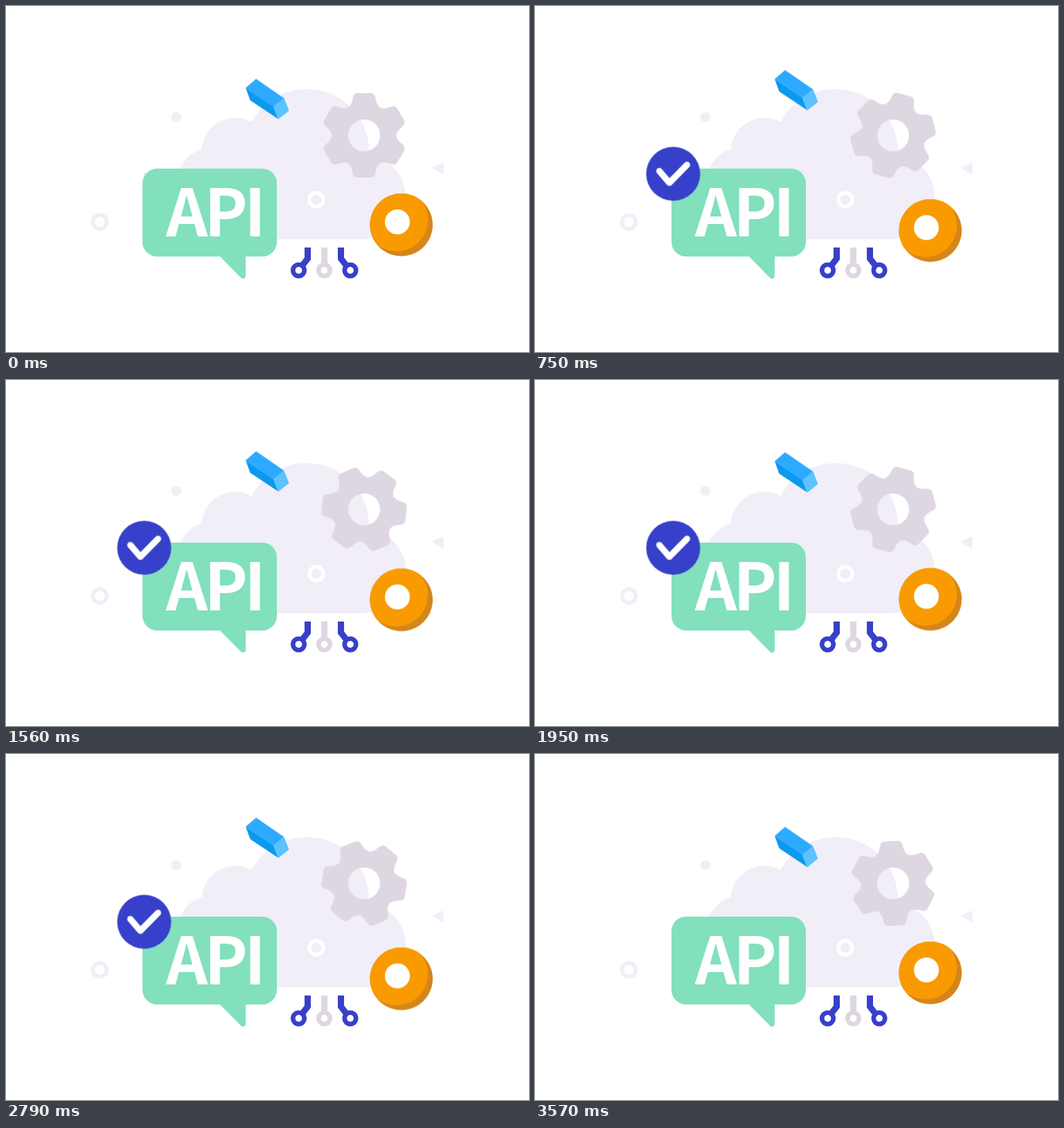
Animation of 755x500 px, one loop 3600 ms. Source, as an HTML page without scripts:

```html
<!DOCTYPE html>
<html lang="en">
<head>
<meta charset="utf-8">
<title>API cloud</title>
<style>
  html, body { margin: 0; width: 100%; height: 100%; overflow: hidden; background: #fff; }
  svg { display: block; width: 100vw; height: 100vh; }
  .pale { fill: #f1eef8; }
  .gear { fill: #ded7e2; }
  .ring, .wire { fill: none; }
  .wire { stroke-width: 9; }
  .label {
    font: bold 94px "Noto Sans CJK JP", "Noto Sans CJK SC", "Noto Sans CJK KR", "Noto Sans CJK TC", sans-serif;
    letter-spacing: -5px;
    fill: #fff;
  }

  .block, .coin { animation: bob 900ms cubic-bezier(.364, 0, .636, 1) infinite alternate; }
  .block { --rise: -13.7px; }
  .coin { --rise: 8.8px; }
  .gear { animation: spin 3600ms linear infinite; }
  .badge { animation: pop 3600ms cubic-bezier(.364, 0, .636, 1) infinite; }

  @keyframes bob { to { transform: translateY(var(--rise)); } }
  @keyframes spin { to { transform: rotate(360deg); } }
  /* springs in over 600 ms and plays the same spring backwards to leave */
  @keyframes pop {
    0% { transform: scale(0); animation-timing-function: cubic-bezier(.3, .45, .6, 1); }
    3.5% { transform: scale(1.19); }
    7.67% { transform: scale(.965); }
    11.83% { transform: scale(1.006); }
    16.67%, 82.5% { transform: scale(1); }
    87.33% { transform: scale(1.006); }
    91.5% { transform: scale(.965); }
    95.67% { transform: scale(1.19); animation-timing-function: cubic-bezier(.4, 0, .7, .55); }
    99.17%, 100% { transform: scale(0); }
  }
</style>
</head>
<body>
<svg viewBox="0 0 755 500">
  <defs>
    <path id="tooth" d="M-23.500-40.700C-19-43.300-18.200-47-17-52C-15.500-59-14-61-9-61H9C14-61 15.500-59 17-52C18.200-47 19-43.300 23.500-40.700Z"/>
    <circle id="node" cy="382" r="8.2" stroke-width="6.6"/>
    <clipPath id="coinEdge"><circle cx="570.7" cy="316.2" r="45.3"/></clipPath>
  </defs>

  <g class="pale">
    <circle cx="434" cy="210" r="90"/>
    <circle cx="331" cy="210" r="48.5"/>
    <circle cx="297" cy="255" r="50"/>
    <circle cx="516" cy="276" r="61"/>
    <path d="M283 210H516V337H283Z"/>
    <circle cx="246" cy="160.5" r="7.3"/>
    <path d="M616.500 234L630.500 227.500V242Z" stroke="#f1eef8" stroke-width="2" stroke-linejoin="round"/>
  </g>
  <circle class="ring" cx="135.5" cy="312" r="10" stroke="#f1eef8" stroke-width="5.5"/>
  <circle class="ring" cx="448" cy="280" r="10" stroke="#fff" stroke-width="5.5"/>

  <g transform="translate(517 187)">
    <g class="gear">
      <circle class="ring" r="34.500" stroke="#ded7e2" stroke-width="23"/>
      <use href="#tooth"/>
      <use href="#tooth" transform="rotate(60)"/>
      <use href="#tooth" transform="rotate(120)"/>
      <use href="#tooth" transform="rotate(180)"/>
      <use href="#tooth" transform="rotate(240)"/>
      <use href="#tooth" transform="rotate(300)"/>
    </g>
  </g>

  <g transform="translate(0 -.7)">
    <g class="block">
      <path fill="#0a99ef" d="M346 119L386 146L393 164L352.500 137Z"/>
      <path fill="#2daaff" d="M346 119L361 106L401.500 134L386 146.500Z"/>
      <path fill="#5cc3ff" d="M386 146L401.500 134L408.500 152L393 164.500Z"/>
    </g>
  </g>

  <g class="wire" stroke="#3740ca">
    <path d="M435.500 349V365L427 376"/>
    <use href="#node" x="422.500"/>
    <path d="M483.500 349V365L492 376"/>
    <use href="#node" x="497"/>
  </g>
  <g class="wire" stroke="#ded7e2">
    <path d="M459.500 349V374"/>
    <use href="#node" x="459.500"/>
  </g>

  <g fill="#82e0bc">
    <rect x="197" y="235" width="194" height="127" rx="21"/>
    <path d="M308 361H346V390Q346 394 342 394Q340 394 338.500 392Z"/>
  </g>
  <text class="label" x="231" y="333">API</text>

  <g class="coin">
    <circle cx="570.7" cy="316.2" r="45.3" fill="#d6851a"/>
    <circle cx="563.7" cy="309.2" r="45.3" fill="#f99b00" clip-path="url(#coinEdge)"/>
    <circle cx="565" cy="312" r="18" fill="#fff"/>
  </g>

  <g transform="translate(199.500 242.500)">
    <g class="badge">
      <circle r="39" fill="#3740ca"/>
      <path d="M-20-4L-5.500 13L20-13" fill="none" stroke="#fff" stroke-width="9" stroke-linecap="round" stroke-linejoin="round"/>
    </g>
  </g>
</svg>
</body>
</html>
```
